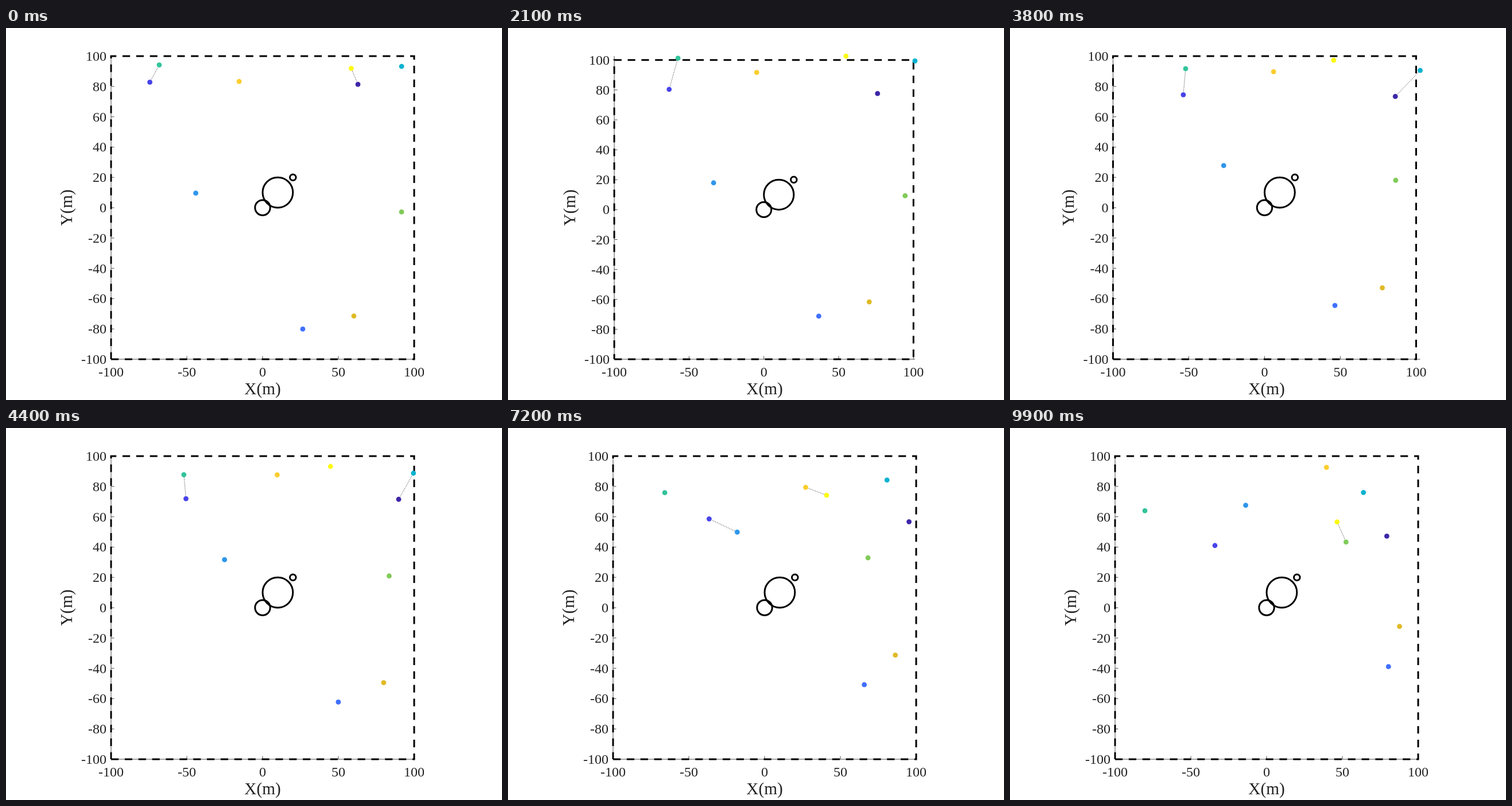
Recreate the animation shown at these times as an HTML page with a canvas. Size 864 px wide and 648 px high, loop 10 s.

```html
<!DOCTYPE html>
<html lang="en">
<head>
<meta charset="utf-8">
<title>Agents in a square arena</title>
<style>
html, body { margin: 0; width: 100%; height: 100%; overflow: hidden; background: #fff; }
canvas { display: block; }
</style>
</head>
<body>
<canvas id="stage" width="864" height="648"></canvas>
<script>
const ctx = document.getElementById('stage').getContext('2d');
const LOOP = 10000, STEP = 100, SPEED = 7, RANGE = 25;
const MID = 447, BOTTOM = 577, HEIGHT = 528;
const INK = '#222';

// Key points by moment; a third value is the heading in degrees at a sharp turn.
const MOMENT = { a: 0, b: 2.1, c: 3.8, d: 5.5, e: 7.2, f: 9.9 };
const AGENTS = [
  ['#3e26a8', { a: [62.9, 81.4], d: [96, 67.3, -38], e: [95.3, 56.7, -142], f: [79.3, 47.2] }],
  ['#4743e8', { a: [-74.4, 82.8], b: [-63.3, 80.4], d: [-45, 66.9], e: [-36.6, 58.6], f: [-34.1, 41] }],
  ['#4070ff', { a: [26.5, -80.1], b: [36.7, -71.2], d: [56.3, -58], f: [80.4, -38.9] }],
  ['#2e96eb', { a: [-44.1, 9.6], b: [-33.6, 17.9], d: [-22, 38.8], f: [-13.8, 67.6] }],
  ['#08b2d0', { a: [91.7, 93.2], b: [101, 99.4, 15], c: [102.7, 90.6, -125], d: [91.9, 88.2], f: [63.9, 76] }],
  ['#33c39b', { a: [-68.2, 94.2], b: [-57.4, 101.2, 0], c: [-52.1, 91.7, -78], d: [-55.9, 82.2, -152], f: [-80.3, 64] }],
  ['#80cb58', { a: [91.7, -2.8], b: [94.4, 9.3, 128], f: [52.4, 43.3] }],
  ['#dfba26', { a: [60.2, -71.5], d: [83.2, -42.7], f: [87.7, -12.4] }],
  ['#fccd2e', { a: [-15.5, 83.3], b: [-4.8, 91.7], d: [16.5, 83.9], e: [27.1, 79.4, 30], f: [39.5, 92.6] }],
  ['#fcf914', { a: [58.5, 91.9], b: [54.9, 102.6, 170], c: [45.6, 97.3, -97], e: [40.9, 74.2], f: [46.5, 56.6] }]
].map(([color, keys]) => ({ color, path: makePath(keys) }));

const OBSTACLES = [[0, 0, 5], [10, 10, 10], [20, 20, 2]];

function makePath(keys) {
  const path = Object.entries(keys).map(([k, [x, y, turn]]) => ({ t: MOMENT[k], x, y, turn }));
  const last = path.length - 1;
  const rate = (a, b, k) => (b[k] - a[k]) / (b.t - a.t);

  // Inner points are passed at constant speed.
  for (let i = 1; i < last; i++) {
    const [a, p, b] = path.slice(i - 1, i + 2);
    const blend = k => rate(a, p, k) * (b.t - p.t) + rate(p, b, k) * (p.t - a.t);
    const angle = p.turn === undefined ? Math.atan2(blend('y'), blend('x')) : p.turn * Math.PI / 180;
    p.vx = SPEED * Math.cos(angle);
    p.vy = SPEED * Math.sin(angle);
  }
  for (const [end, near] of [[path[0], path[1]], [path[last], path[last - 1]]]) {
    end.vx = 1.5 * rate(end, near, 'x') - near.vx / 2;
    end.vy = 1.5 * rate(end, near, 'y') - near.vy / 2;
  }
  return path;
}

function locate(path, t) {
  let i = 0;
  while (i < path.length - 2 && t >= path[i + 1].t) i++;
  const a = path[i], b = path[i + 1], d = b.t - a.t;
  const u = (t - a.t) / d, w = 1 - u;
  const mix = (k, v) => w * w * (1 + 2 * u) * a[k] + u * u * (3 - 2 * u) * b[k]
    + d * u * w * (w * a[v] - u * b[v]);
  return { x: mix('x', 'vx'), y: mix('y', 'vy') };
}

function line(points, width, dash = [], color = '#000') {
  ctx.beginPath();
  points.forEach(([x, y]) => ctx.lineTo(x, y));
  ctx.lineWidth = width;
  ctx.strokeStyle = color;
  ctx.setLineDash(dash);
  ctx.stroke();
  ctx.setLineDash([]);
}

function label(text, x, y, size, align, angle = 0) {
  ctx.save();
  ctx.translate(x, y);
  ctx.rotate(angle);
  ctx.font = `${size}px "Liberation Serif", "Times New Roman", serif`;
  ctx.textAlign = align;
  ctx.fillStyle = INK;
  ctx.fillText(text, 0, 0);
  ctx.restore();
}

function draw(t) {
  const dots = AGENTS.map(a => ({ color: a.color, ...locate(a.path, t) }));

  // The axes grow to hold agents that leave the arena.
  const maxX = Math.max(100, ...dots.map(d => d.x));
  const maxY = Math.max(100, ...dots.map(d => d.y));
  const scale = HEIGHT / (maxY + 100);
  const left = MID - scale * (maxX + 100) / 2;
  const right = 2 * MID - left;
  const px = x => left + (x + 100) * scale;
  const py = y => BOTTOM - (y + 100) * scale;
  const at = (x, y) => [px(x), py(y)];

  ctx.fillStyle = '#fff';
  ctx.fillRect(0, 0, 864, 648);

  line([[left, BOTTOM - HEIGHT], [left, BOTTOM], [right, BOTTOM]], 0.8, [], INK);
  for (let x = -100; x <= 100; x += 50) {
    line([[px(x), BOTTOM], [px(x), BOTTOM - 5.5]], 0.8, [], INK);
    label(x, px(x), 607, 24, 'center');
  }
  for (let y = -100; y <= 100; y += 20) {
    line([[left, py(y)], [left + 5.5, py(y)]], 0.8, [], INK);
    label(y, left - 8, py(y) + 8, 24, 'right');
  }
  label('X(m)', MID, 638, 29.3, 'center');
  label('Y(m)', left - 68, 313, 29.3, 'center', -Math.PI / 2);

  line([at(-100, -100), at(100, -100), at(100, 100), at(-100, 100), at(-100, -100)], 3, [13.2, 10.66]);

  ctx.lineWidth = 3;
  for (const [x, y, r] of OBSTACLES) {
    ctx.beginPath();
    ctx.arc(px(x), py(y), r * scale, 0, 2 * Math.PI);
    ctx.stroke();
  }

  dots.forEach((a, i) => dots.slice(i + 1).forEach(b => {
    if (Math.hypot(a.x - b.x, a.y - b.y) < RANGE) line([at(a.x, a.y), at(b.x, b.y)], 1, [1, 2]);
  }));
  for (const d of dots) {
    ctx.beginPath();
    ctx.arc(px(d.x), py(d.y), 4.4, 0, 2 * Math.PI);
    ctx.fillStyle = d.color;
    ctx.fill();
  }
}

const start = performance.now();
function tick() {
  const ms = (performance.now() - start) % LOOP;
  draw(Math.floor(ms / STEP) * STEP / 1000);
  requestAnimationFrame(tick);
}
tick();
</script>
</body>
</html>
```
